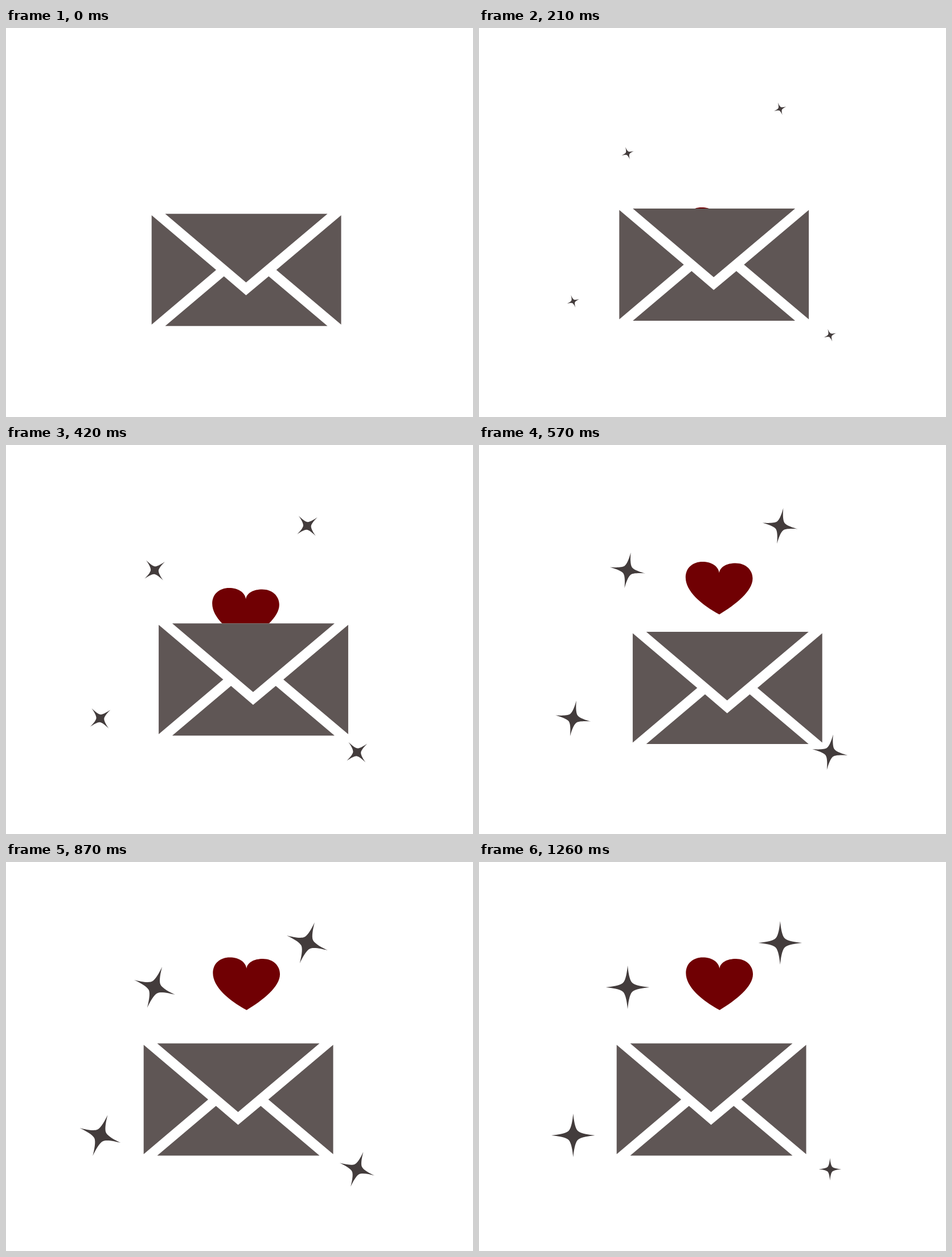
An HTML page with a canvas for the animation above (1.29 s loop, 820 by 683 pixels).

```html
<!DOCTYPE html>
<html lang="en">
<head>
<meta charset="utf-8">
<title>Love letter</title>
<style>
  html, body { margin: 0; width: 100%; height: 100%; overflow: hidden; background: #fff; }
  canvas { display: block; }
</style>
</head>
<body>
<canvas id="stage" width="820" height="683"></canvas>
<script>
const LOOP = 1290, STEP = 30, GROWN = 690, SETTLED = 810, SPIN = 1080;
const ctx = document.getElementById('stage').getContext('2d');

const heart = new Path2D(`M422.3 187C421 175 408 167.5 393 167.5C376 167.5 363.3 178 363.3 195
  C363.3 219 391 243 422.5 260C452 242 481 219 481 197C481 181 468 170 451 170C436 170 424 176 422.3 187Z`);
const paper = new Path2D('M241.7 318.5H574.5V515.5H241.7Z');
const flaps = new Path2D(`M265.5 318.5H550.5L407.5 439Z M241.7 321L355 417L241.7 513Z
  M574.5 321L460.7 417L574.5 513Z M265.5 515.5L368.7 428.2L407.5 461.5L447.3 428.2L550.5 515.5Z`);
const star = new Path2D(`M0-38.3C1-28 3-13 8-8C13-3 28-1 38.3 0C28 1 13 3 8 8C3 13 1 28 0 38.3
  C-1 28-3 13-8 8C-13 3-28 1-38.3 0C-28-1-13-3-8-8C-3-13-1-28 0-38.3Z`);
const centres = [[528.8, 142], [261, 220], [165.4, 480], [616.3, 539.4]];

// Envelope sway: time, x, y
const sway = [
  [0, 14, 7.7], [210, 4.6, -1.5], [420, 26.4, -5.3],
  [570, 28.2, 9.5], [690, 9.4, 11.7], [SETTLED, 0, 0]
];

const smooth = u => u * u * (3 - 2 * u);

function slope(i, axis) {
  const a = sway[i - 1], b = sway[i + 1];
  return a && b ? (b[axis] - a[axis]) / (b[0] - a[0]) : 0;
}

function swayAt(t, axis) {
  if (t >= SETTLED) return 0;
  const i = sway.findIndex(key => key[0] > t) - 1;
  const a = sway[i], b = sway[i + 1], span = b[0] - a[0], u = (t - a[0]) / span;
  return a[axis] + (b[axis] - a[axis]) * smooth(u)
    + span * u * (1 - u) * ((1 - u) * slope(i, axis) - u * slope(i + 1, axis));
}

function fill(path, color, x, y, angle = 0, size = 1) {
  ctx.save();
  ctx.translate(x, y);
  ctx.rotate(angle);
  ctx.scale(size, size);
  ctx.fillStyle = color;
  ctx.fill(path);
  ctx.restore();
}

function draw(t) {
  ctx.clearRect(0, 0, 820, 683);

  const drop = smooth(1 - Math.min(t / SETTLED, 1));
  fill(heart, '#700003', -2.5 * drop, 177 * drop);

  const x = swayAt(t, 1), y = swayAt(t, 2);
  fill(paper, '#fff', x, y);
  fill(flaps, '#5f5655', x, y);

  const angle = 2 * Math.PI * Math.min(t / SPIN, 1);
  const grown = Math.min(t / GROWN, 1);
  const faded = Math.max(t - GROWN, 0) / 1178;
  centres.forEach(([cx, cy], i) => {
    fill(star, '#433c3c', cx, cy, angle, i === 3 ? grown - faded : grown);
  });
}

const start = performance.now();
function tick() {
  const t = (performance.now() - start) % LOOP;
  draw(Math.floor(t / STEP) * STEP);
  requestAnimationFrame(tick);
}
tick();
</script>
</body>
</html>
```
